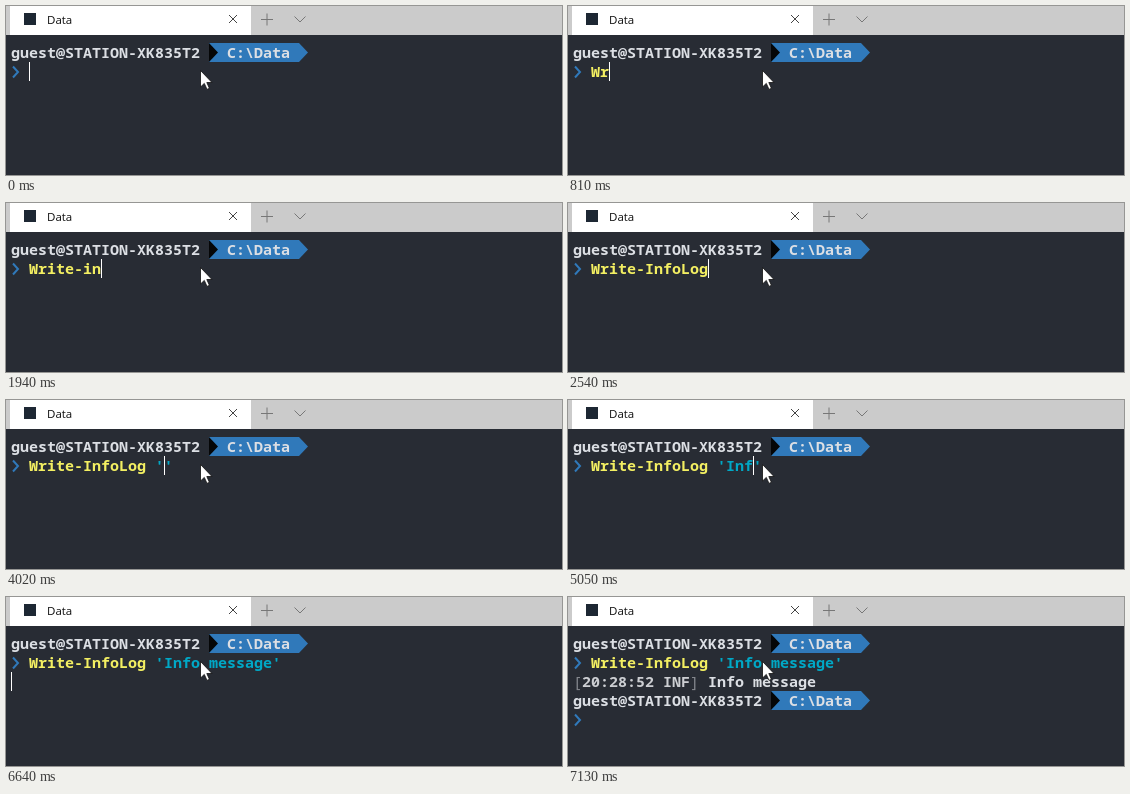
Animation, 556 px wide and 169 px high, one loop 7620 ms. Source, as an HTML page:

```html
<!DOCTYPE html>
<html lang="en">
<head>
<meta charset="utf-8">
<title>Terminal</title>
<style>
  html, body { margin: 0; width: 100%; height: 100%; overflow: hidden; background: #282c34; }
  svg { display: block; }
  text { white-space: pre; font: 600 15px "Noto Sans Mono", "DejaVu Sans Mono", monospace; fill: #dcdfe4; font-variant-ligatures: none; }
  .title { font: 11.5px "Open Sans", "Noto Sans", sans-serif; fill: #111; }
  .line { fill: none; stroke: #444; }
  .soft { stroke: #777; }
  .dim { fill: #85888e; font-weight: 400; }
  .cmd { fill: #f3ef62; }
  .str { fill: #00a8c6; }
</style>
</head>
<body>
<svg width="556" height="169" viewBox="0 0 556 169">
  <defs>
    <g id="prompt">
      <text x="5" y="15">guest@STATION-XK835T2</text>
      <path d="M203 0h90l9 9.500-9 9.500h-90z" fill="#3079ba"/>
      <path d="M203 0l9 9.500-9 9.500z" fill="#050607"/>
      <text x="221" y="15">C:\Data</text>
      <path d="M7 23.500l5 5.500-5 5.500" fill="none" stroke="#3079ba" stroke-width="2"/>
    </g>
  </defs>

  <rect width="556" height="29" fill="#cbcbcb"/>
  <rect x="4" width="241" height="29" fill="#fff"/>
  <rect x="18" y="7" width="12" height="12" fill="#1d2733"/>
  <text class="title" x="41" y="18">Data</text>
  <path class="line" d="M223 9l8 8m0-8l-8 8"/>
  <path class="line soft" d="M255 13.500h12m-6-6v12M288.500 10.500l5.500 5.500 5.500-5.500"/>

  <use href="#prompt" y="37"/>
  <text x="23" y="71"><tspan class="cmd" id="cmd"></tspan><tspan class="str" id="str"></tspan></text>
  <text id="output" x="5" y="90"><tspan class="dim">[</tspan><tspan fill="#ccced2">20:28:52 INF</tspan><tspan class="dim">]</tspan> Info message</text>
  <use id="next" href="#prompt" y="94"/>
  <rect id="caret" width="1" height="19" fill="#fff"/>
  <path d="M194.500 64.500v16.500l3.800-3.600 2.700 6 2.400-1.100-2.600-5.800h5.200z" fill="#fff" stroke="#111" stroke-width=".8"/>
</svg>
<script>
  const LOOP = 7620, CELL = 9, ROW = 19;
  const $ = id => document.getElementById(id);
  const full = "Write-InfoLog 'Info message'";

  // [time, command line, caret column]
  const steps = [[0, '', 0]];
  const show = (time, text, col = text.length) => steps.push([time, text, col]);

  [660, 810, 1050, 1100, 1150, 1450, 1710, 1940, 2310, 2380]
    .forEach((t, i) => show(t, 'Write-info'.slice(0, i + 1)));
  show(2540, full.slice(0, 13));
  show(3000, full.slice(0, 14));
  show(3490, full.slice(0, 15));
  show(3660, full.slice(0, 15) + "'");
  show(4020, full.slice(0, 15) + "'", 15);
  [4550, 4750, 5050, 5150, 5380, 5580, 5650, 5780, 5880, 5970, 6140, 6210]
    .forEach((t, i) => show(t, full.slice(0, 16 + i) + "'", 16 + i));

  function placeCaret(x, y, visible) {
    $('caret').setAttribute('x', x);
    $('caret').setAttribute('y', y);
    $('caret').style.display = visible ? '' : 'none';
  }

  function draw(now) {
    const t = now % LOOP;
    const [, text, col] = steps.findLast(s => s[0] <= t);
    $('cmd').textContent = text.slice(0, 13);
    $('str').textContent = text.slice(13);
    $('output').style.display = t >= 6670 ? '' : 'none';
    $('next').style.display = t >= 6740 ? '' : 'none';

    const row = t < 6640 ? 0 : t < 6670 ? 1 : t < 6740 ? 2 : 3;
    const x = row === 0 ? 23 + col * CELL : row === 3 ? 23 : 5;
    const blinkedOff = t >= 480 && t < 660 || t >= 7130;
    placeCaret(x, 56 + row * ROW, !blinkedOff);
    requestAnimationFrame(draw);
  }
  draw(0);
</script>
</body>
</html>
```
